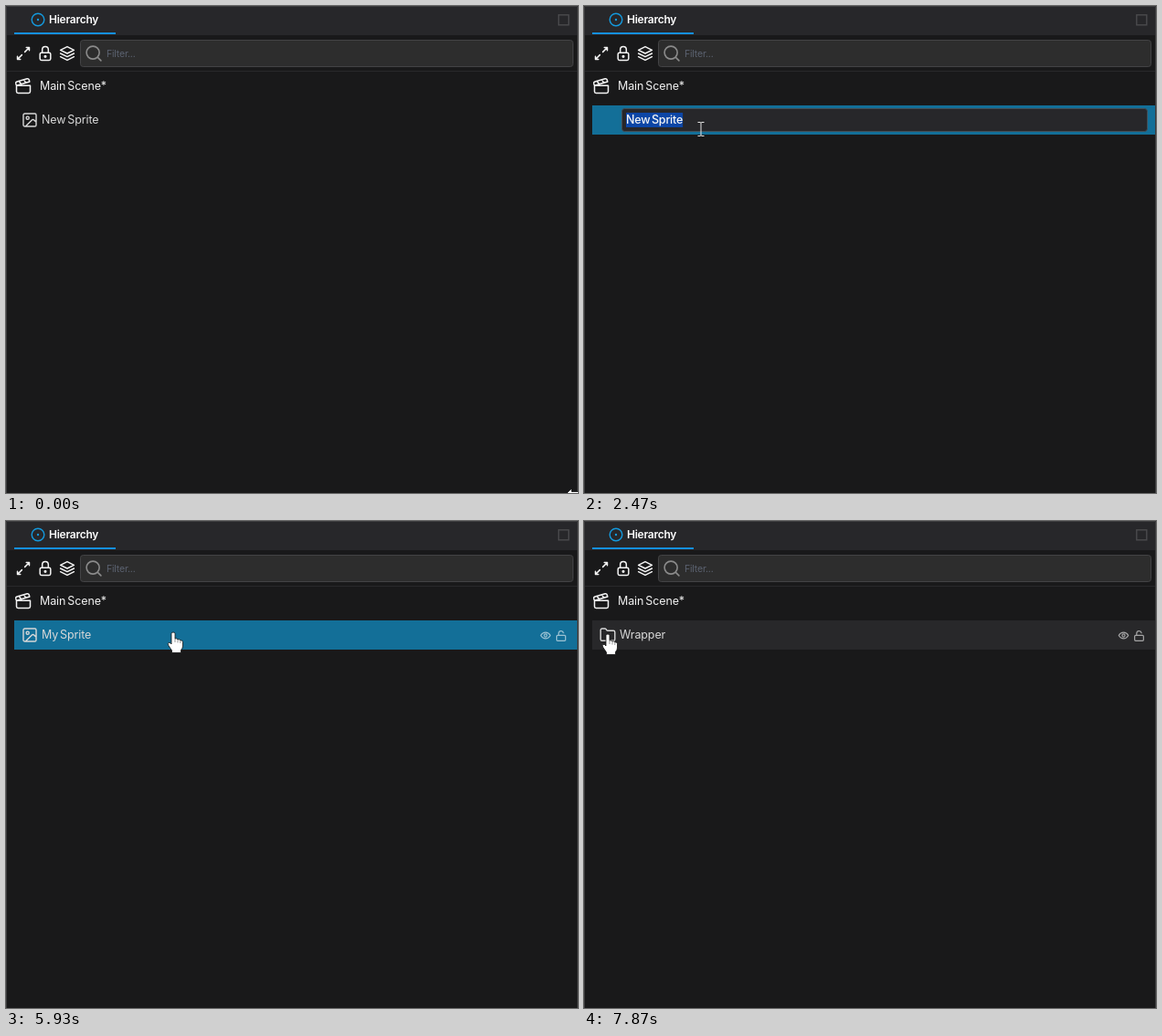
These frames come from a looping animation (626x534 px, 8000 ms). An HTML page:

```html
<!DOCTYPE html>
<html lang="en">
<head>
<meta charset="utf-8">
<title>Hierarchy panel</title>
<style>
  html, body { margin: 0; width: 100%; height: 100%; overflow: hidden; background: #19191a; }
  svg { display: block; width: 100vw; height: 100vh; }
  text { font: 400 12.5px Inter, "Open Sans", sans-serif; letter-spacing: -.1px; word-spacing: -1.5px; white-space: pre; }
  #tab { font-size: 12px; font-weight: 600; letter-spacing: -.25px; }
  #hint { font-size: 10.5px; letter-spacing: -.2px; }
  #menu text { font-size: 11.5px; }
  #menu { filter: drop-shadow(0 2px 3px #0006); }
  #typed { font-weight: 500; letter-spacing: -.2px; }
</style>
</head>
<body>
<svg id="stage" viewBox="0 0 626 534" xmlns="http://www.w3.org/2000/svg">
  <rect width="626" height="534" fill="#19191a"/>
  <rect width="626" height="32" fill="#27272a"/>
  <path d="M0 71.5H626" stroke="#29292b"/>
  <path d="M.5 534V.5H625.5V534" fill="none" stroke="#3b3b3d"/>
  <rect x="9" y="29" width="111" height="2" fill="#1590e0"/>
  <circle cx="35" cy="15" r="6.8" fill="none" stroke="#149ade" stroke-width="1.4"/>
  <circle cx="35" cy="15" r="1.2" fill="#149ade"/>
  <text id="tab" x="47" y="19" fill="#fff">Hierarchy</text>
  <rect x="604.8" y="9.8" width="11" height="11" fill="none" stroke="#4b4b4d" stroke-width="1.4"/>
  <rect x="81.5" y="37.5" width="539" height="29" rx="3" fill="#2d2d2d" stroke="#434345"/>
  <text id="hint" x="110" y="55.7" fill="#5b6270">Filter...</text>
  <text x="37" y="92" fill="#f2f2f2">Main Scene*</text>
  <g id="tools"></g>

  <rect id="row" x="9" y="109" width="616" height="32"/>
  <g id="node">
    <g id="picture"></g>
    <g id="folder"></g>
    <text id="label" x="39" y="129" fill="#d8d8d8"></text>
  </g>
  <g id="toggles" opacity=".58"></g>
  <g id="edit">
    <rect x="41.5" y="112.5" width="575" height="25" rx="3" fill="#27272a" stroke="#444e55"/>
    <rect id="mark" x="46" y="117" height="16" fill="#0c46a6"/>
    <text id="typed" x="46" y="129" fill="#f6f6f6"></text>
    <rect id="caret" y="117" width="1" height="15" fill="#fff"/>
  </g>
  <g id="menu">
    <rect x=".5" y=".5" width="99" height="204" fill="#242425" stroke="#3d3d40"/>
  </g>

  <g id="cursor">
    <g id="hand">
      <path d="M-2 1.6Q-2 0 0 0Q2 0 2 1.6V7Q4 6.3 5 8Q7 7.3 7.8 8.8Q10 8.4 10.5 10.5V15Q10.5 17.5 8.5 19.5V22.5H-1.5V20L-5 14.8Q-6.5 12.2 -5 11.4Q-3.5 10.8 -2 13Z" fill="#fff" stroke="#111" stroke-width=".8"/>
      <path d="M2 7V11M5 8.2V11.5M7.8 9V12" stroke="#555" stroke-width=".6"/>
    </g>
    <path id="arrow" d="M0 0V16.5L4 13L6.5 19L9 18L6.5 12H12Z" fill="#fff" stroke="#111" stroke-width=".9"/>
    <path id="beam" d="M-3.5 -7.5H-.8L0 -6.8L.8 -7.5H3.5M0 -7V7M-3.5 7.5H-.8L0 6.8L.8 7.5H3.5" fill="none" stroke="#e4e4e4"/>
    <path id="resize" d="M-11 0L-6 -5V-1.5H6V-5L11 0L6 5V1.5H-6V5Z" fill="#fff" stroke="#111" stroke-width=".8"/>
  </g>
</svg>
<script>
const LOOP = 8000, FPS = 15, ITEM = 29, FADE = 150;
const $ = id => document.getElementById(id);
const show = (id, on) => $(id).setAttribute('display', on ? 'inline' : 'none');
const set = (el, attrs) => { for (const k in attrs) el.setAttribute(k, attrs[k]); return el; };
const add = (parent, tag, attrs) =>
  parent.appendChild(set(document.createElementNS('http://www.w3.org/2000/svg', tag), attrs));

// Icons are drawn on a 24 unit grid and centred on (x, y).
function icon(parent, d, x, y, scale, color = '#f4f4f4', weight = 1.5) {
  add($(parent), 'path', {
    d, fill: 'none', stroke: color, 'stroke-width': weight / scale,
    'stroke-linecap': 'round', 'stroke-linejoin': 'round',
    transform: `translate(${x} ${y}) scale(${scale}) translate(-12 -12)`
  });
}
const ring = (x, y, r) => `M${x - r} ${y}a${r} ${r} 0 1 0 ${2 * r} 0a${r} ${r} 0 1 0 ${-2 * r} 0`;
const box = (x, y, w, h, r = 2) =>
  `M${x + r} ${y}h${w - 2 * r}a${r} ${r} 0 0 1 ${r} ${r}v${h - 2 * r}a${r} ${r} 0 0 1 ${-r} ${r}` +
  `h${2 * r - w}a${r} ${r} 0 0 1 ${-r} ${-r}v${2 * r - h}a${r} ${r} 0 0 1 ${r} ${-r}z`;

icon('tools', 'M16 4h4v4M14 10l6-6M8 20H4v-4M4 20l6-6', 19, 52, .81);
icon('tools', box(5, 11, 14, 10) + ring(12, 16, 1) + 'M8 11V7a4 4 0 0 1 8 0v4', 43, 52, .83);
icon('tools', 'M12 2 2 7l10 5 10-5zM2 12l10 5 10-5M2 17l10 5 10-5', 67, 52, .74);
icon('tools', ring(11, 11, 8) + 'M21 21l-4.3-4.3', 96, 52, .88, '#8b8b8b', 1.6);
icon('tools', 'M20.2 6 3 11l-.9-2.4c-.3-1.1.3-2.2 1.3-2.5l13.5-4c1.1-.3 2.2.3 2.5 1.3zM6.2 5.3l3.1 3.9' +
  'M12.4 3.4l3.1 4M3 11h18v8a2 2 0 0 1-2 2H5a2 2 0 0 1-2-2z', 19, 88, .833);
icon('picture', box(3, 3, 18, 18) + ring(9, 9, 2) + 'M21 15l-3.1-3.1a2 2 0 0 0-2.8 0L6 21', 26, 125, .78, '#d8d8d8', 1.4);
icon('folder', 'M20 20a2 2 0 0 0 2-2V8a2 2 0 0 0-2-2h-7.9a2 2 0 0 1-1.7-.9L9.6 3.9A2 2 0 0 0 7.9 3H4' +
  'a2 2 0 0 0-2 2v13a2 2 0 0 0 2 2z', 26, 125, .78, '#d8d8d8', 1.4);
icon('toggles', 'M2 12s3.5-6.5 10-6.5S22 12 22 12s-3.5 6.5-10 6.5S2 12 2 12' + ring(12, 12, 3), 590.5, 125.5, .52, '#fff', 1.2);
icon('toggles', box(3, 11, 18, 11) + 'M7 11V7a5 5 0 0 1 9.9-1', 607.5, 126, .54, '#fff', 1.2);

const items = ['Copy', 'Paste', 'Rename', 'Delete', 'Wrap'].map(s => s + ' Node')
  .concat('Create Prefab', 'Create Script')
  .map((name, i) => {
    const y = 1 + i * ITEM;
    const glow = add($('menu'), 'rect', { x: 1, y, width: 98, height: ITEM, fill: '#3d3d3e' });
    add($('menu'), 'text', { x: 13, y: y + 19, fill: '#d6d6d6' }).textContent = name;
    return glow;
  });

const ease = {
  line: p => p,
  out: p => 1 - (1 - p) ** 2,
  both: p => p * p * (3 - 2 * p)
};
// Pointer stops: time, x, y, easing on the way there
const stops = [
  [0, 625, 534], [30, 625, 534], [530, 77, 127, 'both'], [1200, 77, 127],
  [1400, 118.5, 165, 'line'], [1730, 136, 210, 'out'], [2070, 136, 210],
  [2470, 128, 135, 'both'], [2870, 184, 122, 'both'], [2930, 183.5, 120, 'line'],
  [5670, 183.5, 120], [5800, 178.5, 121, 'both'], [5930, 183, 122, 'both'], [6400, 183, 122],
  [7130, 228.5, 253, 'both'], [7350, 228.5, 253], [7870, 26, 124, 'both'], [LOOP, 26, 124]
];
function pointer(t) {
  const i = Math.max(1, stops.findIndex(s => s[0] >= t));
  const [t0, x0, y0] = stops[i - 1], [t1, x1, y1, kind = 'line'] = stops[i];
  const p = ease[kind](Math.max(0, (t - t0) / (t1 - t0)));
  return [x0 + (x1 - x0) * p, y0 + (y1 - y0) * p];
}

const menus = [{ from: 930, to: 2070, x: 77, y: 127 }, { from: 6130, to: 7400, x: 182, y: 122 }];
const EDIT = 2070, DONE = 5200, WRAP = 7400;
const typing = [
  [EDIT, 'New Sprite'], [3670, 'M'], [4000, 'My'], [4070, 'My '], [4330, 'My S'], [4530, 'My Sp'],
  [4670, 'My Spr'], [4730, 'My Spri'], [4870, 'My Sprit'], [5070, 'My Sprite']
];

// Share of the last FADE ms that the pointer spent on an item
function glow(menu, i, t) {
  let n = 0;
  for (let k = 0; k < 15; k++) {
    const y = pointer(t - k * FADE / 15)[1] - menu.y - 1;
    if (Math.floor(y / ITEM) === i) n++;
  }
  return n / 15;
}

function draw(t) {
  const [x, y] = pointer(t);
  const menu = menus.find(m => t >= m.from && t < m.to);
  const editing = t >= EDIT && t < DONE;
  const over = y >= 109 && y < 141;
  const picked = t >= 870 && t < WRAP;

  show('row', picked || over);
  $('row').setAttribute('fill', !picked ? '#28282a' : menu ? '#164f6a' : '#136f98');
  show('node', !editing);
  show('picture', t < WRAP);
  show('folder', t >= WRAP);
  $('label').textContent = t < EDIT ? 'New Sprite' : t < WRAP ? 'My Sprite' : 'Wrapper';
  show('toggles', over && !menu && !editing);

  show('edit', editing);
  if (editing) {
    $('typed').textContent = typing.filter(k => t >= k[0]).pop()[1];
    const width = $('typed').getComputedTextLength();
    const marked = t < 2870 || (t >= 3200 && t < 3670);
    show('mark', marked);
    show('caret', !marked);
    $('mark').setAttribute('width', width);
    $('caret').setAttribute('x', Math.round(46 + width));
  }

  show('menu', menu);
  if (menu) {
    $('menu').setAttribute('transform', `translate(${menu.x} ${menu.y})`);
    items.forEach((el, i) => el.setAttribute('opacity', glow(menu, i, t)));
  }

  const kind = x > 618 ? 'resize' : editing ? (y < 138 ? 'beam' : 'arrow') : menu || over ? 'hand' : 'arrow';
  for (const id of ['hand', 'arrow', 'beam', 'resize']) show(id, id === kind);
  $('cursor').setAttribute('transform', `translate(${x} ${y})`);
}

function tick() {
  const t = performance.now() % LOOP;
  const step = Math.floor(t * FPS / 1000 + .06);
  draw(Math.min(LOOP, Math.round(step * 100 / FPS) * 10));
  requestAnimationFrame(tick);
}
tick();
</script>
</body>
</html>
```
